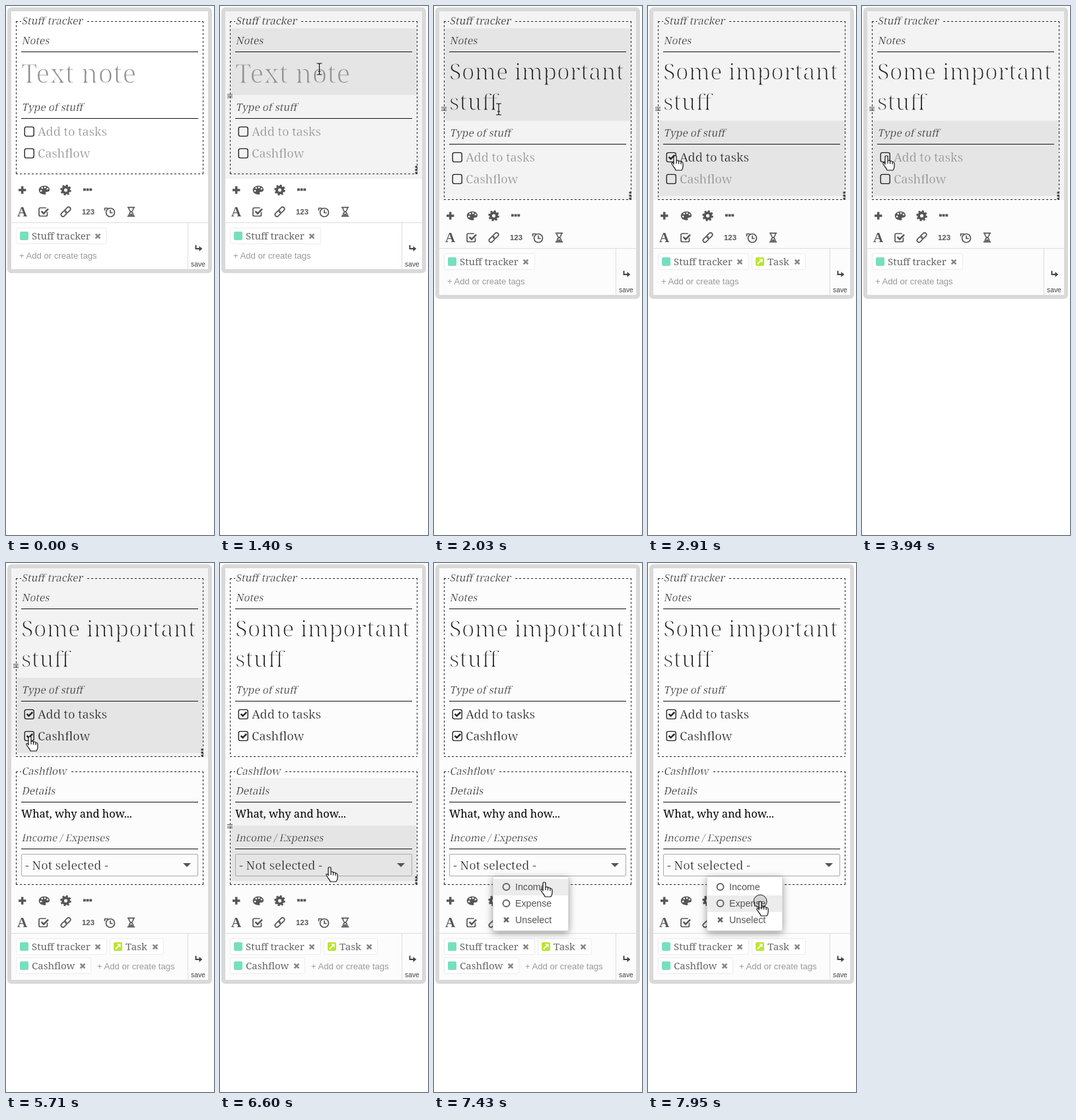
Recreate the animation shown at these times as an HTML page. Size 315 by 802 pixels, loop 8000 ms.

```html
<!DOCTYPE html>
<html lang="en">
<head>
<meta charset="utf-8">
<title>Note form</title>
<style>
html, body { margin: 0; width: 100%; height: 100%; overflow: hidden; background: #fff; }
svg { display: block; }
text { font-family: "Noto Serif", serif; font-size: 18.2px; fill: #222; white-space: pre; }
.thin { stroke: var(--bg, #fff); stroke-width: .45px; }
.big { stroke: var(--bg, #fff); stroke-width: 1.5px; fill: #222; font-size: 34.4px; }
.hint { fill: #8f8f8f; font-size: 39.7px; }
.head { font-size: 15.6px; fill: #222; }
.tag text { font-size: 15px; fill: #666; }
.tag rect.edge { fill: #fff; stroke: #ececec; }
.sans, #menu text { font-family: "Liberation Sans", Arial, sans-serif; }
#menu text { font-size: 14.2px; fill: #555; }
.rule { stroke: #111; }
.dash { fill: none; stroke: #222; stroke-dasharray: 3 3; stroke-dashoffset: .5; shape-rendering: crispEdges; }
.icons { fill: #555; stroke: #555; stroke-width: 0; }
.line { fill: none; stroke-width: 1.7; stroke-linecap: round; stroke-linejoin: round; }
.box { fill: none; stroke: #222; stroke-width: 1.4; }
.tick { fill: none; stroke: #222; stroke-width: 2.4; }
</style>
</head>
<body>
<svg width="315" height="802" viewBox="0 0 315 802">
  <defs>
    <path id="cross" d="M-3.4-3.4 3.4 3.4M3.4-3.4-3.4 3.4" stroke-width="2.7" fill="none"/>
    <rect id="check" class="box" x="28.2" y="-7.1" width="14" height="14" rx="2.6"/>
    <path id="mark" class="tick" d="M31.5-.6 34.5 2.4 40.2-3.4"/>
    <path id="grip" d="M11-2.5h8M11 0h8M11 2.5h8" stroke="#555"/>
    <path id="dots" d="M295.5-12h3.5v3h-3.5zM295.5-7.5h3.5v3h-3.5zM295.5-3h3.5v3h-3.5z" fill="#444"/>
  </defs>

  <rect id="frame" x="5" y="5" width="304" height="397" rx="3" stroke="#d9d9d9" stroke-width="6"/>
  <rect id="sec1" x="8" y="8" width="298" fill="#f3f3f3"/>
  <rect id="sec2" x="16" y="326" width="282" height="161" fill="#f3f3f3"/>
  <rect id="row" x="16" width="282" fill="#e5e5e5"/>

  <g id="form1">
    <path id="edge1" class="dash"/>
    <g id="notes">
      <text class="head thin" data-at="23.5 28">Stuff tracker</text>
      <text class="head thin" data-at="23.5 58">Notes</text>
      <path class="rule" d="M23 69.5h268"/>
      <text id="hint" class="big hint" x="23" y="117">Text note</text>
      <g id="typed">
        <text class="big" x="23" y="112">Some important</text>
        <text class="big" x="23" y="158">stuff</text>
      </g>
      <rect id="caret" width="1" fill="#111"/>
    </g>
    <g id="kind">
      <text class="head thin" data-at="23.5 159">Type of stuff</text>
      <path class="rule" d="M23 170.5h268"/>
      <use href="#check" y="190.5"/>
      <use id="mark1" href="#mark" y="190.5"/>
      <text id="label1" class="thin" x="48" y="197">Add to tasks</text>
      <use href="#check" y="223.5"/>
      <use id="mark2" href="#mark" y="223.5"/>
      <text id="label2" class="thin" x="48" y="230">Cashflow</text>
    </g>
    <use id="grip1" href="#grip"/>
    <use id="dots1" href="#dots"/>
  </g>

  <g id="form2">
    <path id="edge2" class="dash"/>
    <text class="head thin" data-at="23.5 321">Cashflow</text>
    <g id="details">
      <text class="head thin" data-at="23.5 351">Details</text>
      <path class="rule" d="M23 362.5h268"/>
      <text x="23" y="386" style="font-size:16.4px;fill:#000">What, why and how...</text>
    </g>
    <g id="money">
      <text class="head thin" data-at="23.5 422" style="font-size:15.1px">Income / Expenses</text>
      <path class="rule" d="M23 433.5h268"/>
      <rect x="23.5" y="441.5" width="267" height="33" rx="1.5" fill="none" stroke="#aaa"/>
      <text class="thin" x="29" y="465">- Not selected -</text>
      <path d="M268 455h12l-6 6z" fill="#555"/>
    </g>
    <g id="grip2"><use href="#grip" y="399"/><use href="#dots" y="487"/></g>
  </g>

  <g id="low">
    <g class="icons">
      <path d="M19 277.3h4v-4h3.4v4h4v3.4h-4v4H23v-4h-4z"/>
      <path fill-rule="evenodd" d="M58 272.5c5 0 8 2.6 8 6 0 2.5-2 3.3-4 3.2-2-.1-2.6 1-1.7 2.2 1 1.4-.7 1.8-2.3 1.8-5 0-8.3-3-8.3-6.6s3.3-6.6 8.3-6.6zM54.7 274.4a1.4 1.4 0 1 0 .1 0zM59 273.7a1.4 1.4 0 1 0 .1 0zM62.8 275.7a1.4 1.4 0 1 0 .1 0zM53 278.8a1.4 1.4 0 1 0 .1 0z"/>
      <g fill="none" transform="translate(90.5 279)">
        <circle r="4.5" stroke-width="3.9"/>
        <circle r="7" stroke-width="2.6" stroke-dasharray="3 2.498"/>
      </g>
      <path d="M117 276.5h3.8v3.8H117zM121.7 276.5h3.8v3.8h-3.8zM126.4 276.5h3.8v3.8h-3.8z"/>
      <text x="17" y="319" style="font:bold 21px 'Liberation Serif',serif;fill:#555">A</text>
      <g class="line">
        <path d="M62.5 313v3.500a2 2 0 0 1-2 2h-8.500a2 2 0 0 1-2-2v-8.500a2 2 0 0 1 2-2h8"/>
        <path d="M53.5 311.2l3.500 3.500 7-7" stroke-width="2.5" stroke-linecap="butt" stroke-linejoin="miter"/>
        <g transform="translate(90.5 312) rotate(-45)">
          <path d="M.5 2.2A2.900 2.900 0 0 1-2 2.900H-6a2.900 2.900 0 0 1 0-5.800H-2A2.900 2.900 0 0 1 .9 0M-.5-2.200A2.900 2.900 0 0 1 2-2.900H6a2.900 2.900 0 0 1 0 5.800H2A2.900 2.900 0 0 1-.9 0"/>
        </g>
        <circle cx="158" cy="313" r="6.5"/>
        <path d="M158 309.500v4h3M149.500 306.500h4.500M149.500 306.500v3"/>
        <path d="M184.5 305.3h10M184.5 318.7h10M186 306c0 4 2 5 3 6-1 1-3 2-3 6M193 306c0 4-2 5-3 6 1 1 3 2 3 6"/>
        <path d="M188 316.8l1.500-1.500 1.500 1.500z"/>
      </g>
      <text class="sans" x="115" y="316" style="font-size:11.4px;font-weight:bold;fill:#555">123</text>
    </g>
    <path d="M8 328.5h298M275.5 328.5V399" stroke="#ddd"/>
    <path d="M287.5 362.5v5.500h6" fill="none" stroke="#444" stroke-width="2"/>
    <path d="M292.5 364l4.800 4-4.800 4z" fill="#444"/>
    <text class="sans" x="280" y="395" style="font-size:10.3px;fill:#444">save</text>
    <g class="tag">
      <rect class="edge" x="15.5" y="336.5" width="137" height="24" rx="2"/>
      <rect x="21" y="342" width="13" height="13" rx="2" fill="#76dfbf"/>
      <text x="39" y="354">Stuff tracker</text>
      <use href="#cross" x="139" y="349" stroke="#888"/>
    </g>
    <g class="tag" id="task">
      <rect class="edge" x="157.5" y="336.5" width="81" height="24" rx="2"/>
      <rect x="163" y="342" width="13" height="13" rx="2" fill="#b9e62e"/>
      <path d="M165.800 352.200l5-5" stroke="#fff" stroke-width="2"/>
      <path d="M168 344.500h5.500v5.500z" fill="#fff"/>
      <text x="181" y="354">Task</text>
      <use href="#cross" x="226" y="349" stroke="#888"/>
    </g>
    <g class="tag" id="cash">
      <rect class="edge" x="15.5" y="365.5" width="113" height="24" rx="2"/>
      <rect x="21" y="371" width="13" height="13" rx="2" fill="#76dfbf"/>
      <text x="39" y="383">Cashflow</text>
      <use href="#cross" x="116" y="378" stroke="#888"/>
    </g>
    <text id="add" class="sans" y="383" style="font-size:13.1px;fill:#999">+ Add or create tags</text>
  </g>

  <g id="menu">
    <rect x="89.5" y="475.5" width="114" height="82" rx="2" fill="#fff" stroke="#ddd" style="filter:drop-shadow(0 3px 6px rgba(0,0,0,.4))"/>
    <rect id="pick" x="90" width="113" height="25" fill="#ececec"/>
    <g fill="none" stroke="#666" stroke-width="2">
      <circle cx="109.5" cy="491" r="5"/>
      <circle cx="109.5" cy="516" r="5"/>
      <use href="#cross" x="109.5" y="541"/>
    </g>
    <text x="123" y="496">Income</text>
    <text x="123" y="521">Expense</text>
    <text x="123" y="546">Unselect</text>
  </g>

  <g id="mouse" stroke-linejoin="round">
    <path id="hand" fill="#fff" stroke="#111" stroke-width="1.2" d="M-2 2Q-2 0 0 0T2 2V8Q2 7 3.8 7T5.5 9Q6 8 7.5 8T9 10Q9.5 9.3 10.5 9.5 12 9.7 12 12V16Q12 19 10 22H1Q0 19-2 17L-5 12.5Q-5.5 10.5-4 10.5T-2 13ZM2 8v4M5.5 9v3.5M9 10v3"/>
    <path id="arrow" fill="#fff" stroke="#111" d="M0 0V16L4 12.5 6.5 18.5 9 17.5 6.5 11.5H11.5Z"/>
    <path id="beam" fill="none" stroke="#111" stroke-width="1.2" d="M-4-8h3l1 1 1-1h3M0-7V8M-4 9h3l1-1 1 1h3M-2 4h4"/>
    <circle id="ring" r="10" fill="#000" fill-opacity=".1" stroke="#222"/>
  </g>
</svg>
<script>
const LOOP = 8000;
const $ = id => document.getElementById(id);
const show = (id, on) => $(id).style.display = on ? '' : 'none';
const set = (id, attrs) => { for (const k in attrs) $(id).setAttribute(k, attrs[k]); };
const within = (t, ...spans) => spans.some(([a, b]) => t >= a && t < b);

// Dashed sides, open at the top for the legend
const border = (top, bottom, open) =>
  `M15 ${top}H23M${open} ${top}H299M15 ${bottom}H299` +
  [15.5, 298.5].map(x => `M${x} ${top - .5}V${bottom + .5}`).join('');

// Slanted headings
document.querySelectorAll('[data-at]').forEach(e =>
  e.setAttribute('transform', `translate(${e.dataset.at}) skewX(-12)`));
set('edge2', { d: border(316.5, 487.5, 99) });

// Pointer: time, x, y
const path = [
  [0, 170, -40], [250, 169, -15], [390, 168, 14], [510, 162, 48], [640, 154, 82], [760, 150.5, 95],
  [1790, 144, 102], [1910, 125, 124], [2030, 98, 156], [2160, 68, 192], [2280, 46, 218], [2400, 37, 227],
  [2910, 41, 227], [3300, 33, 227], [3820, 37, 227], [4830, 36, 234], [4950, 36, 244], [5070, 36, 255],
  [5190, 36, 263], [5990, 44, 272], [6110, 68, 308], [6230, 102, 362], [6360, 137, 418], [6480, 159, 450],
  [6600, 166, 461], [7430, 167, 484], [7560, 169, 502], [7710, 170, 508], [7830, 170, 513]
];

function render(t) {
  const [, x, y] = path.findLast(p => p[0] <= t);
  const typed = t >= 1540, cash = t >= 5710, menu = t >= 7030;
  const shift = typed ? 39 : 0, off = cash ? 233 : shift;
  const task = within(t, [2660, 3700], [4710, LOOP]);
  const end = 254.5 + shift;

  // Hover areas follow the pointer
  const onMenu = menu && y > 479;
  const in1 = y > 0 && y < end + 7, in2 = cash && !onMenu && y > 308 && y < 495;
  const rows = [
    ['notes', 34, 135 + shift, in1], ['kind', 135 + shift, 249 + shift, in1],
    ['details', 326, 398, in2], ['money', 398, 482, in2]
  ];
  const base = typed ? '#fcfcfc' : '#fff';
  set('frame', { height: 397 + off, fill: base });
  show('sec1', in1);
  show('sec2', in2);
  set('sec1', { height: typed ? 286 : 254 });
  show('row', false);
  for (const [id, top, bottom, active] of rows) {
    const hit = active && y >= top && y < bottom;
    $(id).style.setProperty('--bg', hit ? '#e5e5e5' : active ? '#f3f3f3' : base);
    if (hit) {
      show('row', true);
      set('row', { y: top, height: bottom - top });
    }
  }

  set('edge1', { d: border(23.5, end, 123) });
  set('kind', { transform: `translate(0 ${shift})` });
  set('grip1', { y: typed ? 156 : 136.5 });
  set('dots1', { y: end });
  show('grip1', in1);
  show('dots1', in1);
  show('hint', !typed);
  show('typed', typed);
  show('caret', within(t, [910, 1400], [1540, 2030], [2540, 2660]));
  set('caret', typed ? { x: 98, y: 121, height: 46 } : { x: 23, y: 75, height: 53 });
  show('mark1', task);
  show('mark2', cash);
  $('label1').style.fill = task ? '#111' : '#888';
  $('label2').style.fill = cash ? '#111' : '#888';

  show('form2', cash);
  show('grip2', in2);
  set('low', { transform: `translate(0 ${off})` });
  show('task', within(t, [2790, 3820], [4830, LOOP]));
  show('cash', cash);
  set('add', { x: cash ? 138 : 20 });

  show('menu', menu);
  $('menu').style.opacity = t < 7150 ? .6 : 1;
  show('pick', onMenu);
  set('pick', { y: y < 504 ? 479 : 504 });

  const beam = t >= 640 && t < 2160;
  set('mouse', { transform: `translate(${x} ${y})` });
  show('arrow', t < 640);
  show('beam', beam);
  show('hand', t >= 640 && !beam);
  show('ring', within(t, [910, 1030], [2540, 2660], [4560, 4710], [5190, 5310], [7030, 7150], [7950, LOOP]));
}

const start = performance.now();
function tick() {
  render((performance.now() - start) % LOOP);
  requestAnimationFrame(tick);
}
tick();
</script>
</body>
</html>
```
